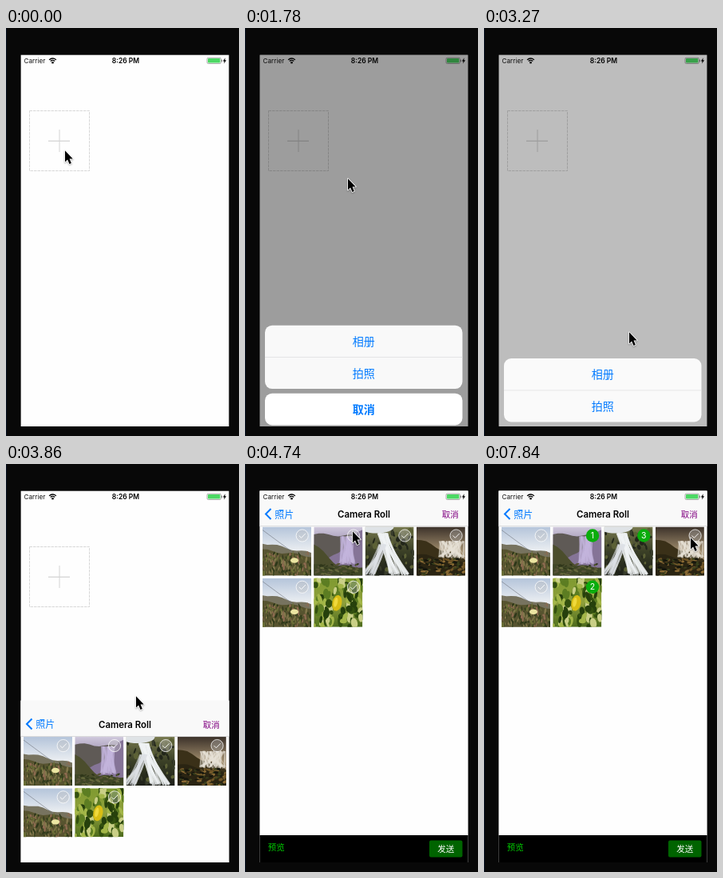
These frames come from a looping animation (292x510 px, 8000 ms). An HTML page with a canvas:

```html
<!DOCTYPE html>
<html lang="zh">
<head>
<meta charset="utf-8">
<title>Photo picker</title>
<style>
html, body { margin: 0; width: 100%; height: 100%; overflow: hidden; background: #080808; }
canvas { display: block; width: 292px; height: 510px; }
</style>
</head>
<body>
<canvas id="stage"></canvas>
<script>
const W = 292, H = 510, LOOP = 8000, STEPS = 54, SIZE = 61;
const canvas = document.getElementById('stage');
const c = canvas.getContext('2d');
const dpr = window.devicePixelRatio || 1;
canvas.width = W * dpr;
canvas.height = H * dpr;

const LATIN = 'Inter, Roboto, sans-serif';
const CJK = '"Noto Sans CJK SC", "Noto Sans CJK", sans-serif';
const BLUE = '#007aff';
const SCREEN = [18.4, 33.4, 261.2, 464.6];

// Pointer stops: step, x, y
const PATH = [
  [0, 74, 153], [2, 70, 153], [10, 70, 153], [12, 129, 188], [17, 179, 384],
  [20, 180, 387], [22, 182, 380], [26, 163, 290], [29, 150, 258], [32, 135, 84],
  [34, 135, 85], [37, 75, 150], [40, 149, 151], [43, 244, 417], [45, 192, 133],
  [48, 197, 87], [53, 259, 92]
];

function rect(color, x, y, w, h) {
  c.fillStyle = color;
  c.fillRect(x, y, w, h);
}

function round(color, x, y, w, h, r) {
  c.fillStyle = color;
  c.beginPath();
  c.roundRect(x, y, w, h, r);
  c.fill();
}

function trace(pts) {
  c.beginPath();
  for (let i = 0; i < pts.length; i += 2) c.lineTo(pts[i], pts[i + 1]);
}

function poly(color, ...pts) {
  trace(pts);
  c.fillStyle = color;
  c.fill();
}

function line(color, width, ...pts) {
  trace(pts);
  c.strokeStyle = color;
  c.lineWidth = width;
  c.stroke();
}

function oval(color, x, y, rx, ry = rx, turn = 0) {
  c.beginPath();
  c.ellipse(x, y, rx, ry, turn, 0, 7);
  c.fillStyle = color;
  c.fill();
}

function text(str, x, y, size, color, { align = 'center', weight = 400, font = CJK } = {}) {
  c.font = `${weight} ${size}px ${font}`;
  c.textAlign = align;
  c.textBaseline = 'middle';
  c.fillStyle = color;
  c.fillText(str, x, y);
}

// Remaining share of a critically damped spring begun at a given step
function spring(step, start) {
  const x = Math.max(0, step - start) * 2.71;
  return (1 + x) * Math.exp(-x);
}

function random(seed) {
  return () => {
    seed = (seed * 16807) % 2147483647;
    return seed / 2147483647;
  };
}

function backdrop(...colors) {
  const g = c.createLinearGradient(0, 0, 0, SIZE);
  colors.forEach((col, i) => g.addColorStop(i / (colors.length - 1), col));
  rect(g, 0, 0, SIZE, SIZE);
}

// Ground below a wavy line from the left edge to the right edge
function ridge(color, left, right, wave = 1.5) {
  const pts = [0, SIZE];
  for (let u = 0; u <= 1.01; u += 0.1) {
    pts.push(u * SIZE, left + (right - left) * u + wave * Math.sin(u * 11 + left));
  }
  poly(color, ...pts, SIZE, SIZE);
}

function specks(n, colors, top, rx, ry) {
  const rnd = random(n * 977);
  for (let i = 0; i < n; i++) {
    oval(colors[i % colors.length], rnd() * SIZE, top + rnd() * (SIZE - top), rx * (0.5 + rnd()), ry * (0.5 + rnd()), rnd() - 0.5);
  }
}

// Falling water: strands that fan out from one spot to another
function water(color, n, [x0, y0, w0], [x1, y1, w1]) {
  const rnd = random(n * 431);
  c.strokeStyle = color;
  for (let i = 0; i < n; i++) {
    const a = x0 + (rnd() - 0.5) * w0, b = x1 + (rnd() - 0.5) * w1;
    c.lineWidth = 0.8 + rnd() * 2;
    c.beginPath();
    c.moveTo(a, y0);
    c.quadraticCurveTo(a + (b - a) * 0.4, (y0 + y1) / 2, b, y1 - rnd() * 4);
    c.stroke();
  }
}

function meadow() {
  backdrop('#b4c4da', '#eceff2', '#d9d9d4');
  ridge('#77735f', 20, 33);
  ridge('#57532f', 29, 37);
  specks(150, ['#83784c', '#39441f', '#8d6a50', '#2c3618', '#6c7038'], 33, 0.9, 2.6);
  line('#70757c', 0.6, 0, 4, 38, 32);
  oval('#ece6a2', 40, 42, 5, 3.2);
}

function violetFalls() {
  backdrop('#cfc8dc', '#8b7da0', '#6a5c78');
  ridge('#5f5a56', 9, 12);
  ridge('#857497', 58, 4, 3);
  water('rgba(196,180,220,.55)', 40, [42, 12, 18], [41, 47, 20]);
  ridge('#4b4d2c', 22, 74, 2);
  ridge('#3f4626', 48, 50);
  specks(50, ['#66693c', '#2f3619', '#575238'], 46, 2.2, 1);
}

function cascade() {
  backdrop('#77794f', '#3b4026', '#1c1e18');
  specks(70, ['#5c6136', '#22261a', '#383c2b'], 4, 2, 3);
  oval('#dfe3e6', 14, 0, 22, 8);
  water('rgba(240,243,246,.6)', 36, [22, 8, 12], [42, 61, 26]);
  water('rgba(222,226,230,.6)', 22, [22, 22, 10], [4, 61, 16]);
}

function duskFalls() {
  backdrop('#3c322a', '#a08c6c', '#5a4526');
  ridge('#3a3018', 15, 40, 2);
  water('rgba(232,226,216,.55)', 44, [44, 18, 32], [44, 40, 34]);
  ridge('#2a2412', 34, 44);
  specks(90, ['#6e5426', '#39401c', '#15160d', '#8a6a34'], 40, 2.4, 1.2);
}

function pepper() {
  backdrop('#7f9a30', '#8fa03c', '#4c6a1c');
  specks(110, ['#a3b648', '#33500f', '#c9cf86', '#5c7d22', '#26400c'], 0, 3, 5);
  oval('#d8bd14', 29, 31, 6, 10, 0.2);
  oval('#f0d93c', 27.5, 30, 2.3, 6, 0.2);
}

const PHOTOS = [meadow, violetFalls, cascade, duskFalls, meadow, pepper];
// Photo index to step of its tap, in order of picking
const PICKS = new Map([[1, 34], [5, 39], [2, 48]]);

function badge(i, step) {
  const x = 49.7, y = 11;
  if (step >= PICKS.get(i)) {
    oval('#0aad0c', x, y, 8.2);
    text([...PICKS.keys()].indexOf(i) + 1, x, y + 0.5, 10.5, '#fff', { font: LATIN });
    return;
  }
  oval('rgba(190,190,190,.35)', x, y, 7.6);
  c.beginPath();
  c.arc(x, y, 7.6, 0, 7);
  c.strokeStyle = 'rgba(255,255,255,.85)';
  c.lineWidth = 0.9;
  c.stroke();
  line('rgba(255,255,255,.9)', 1, x - 4, y, x - 1.2, y + 2.8, x + 4.2, y - 2.7);
}

function photo(i, step) {
  c.save();
  c.translate(22 + (i % 4) * 64.3, 78.5 + Math.floor(i / 4) * 64.3);
  c.beginPath();
  c.rect(0, 0, SIZE, SIZE);
  c.clip();
  PHOTOS[i]();
  badge(i, step);
  c.restore();
}

function picker(step) {
  const left = spring(step, 25.454);
  if (left >= 1) return;
  c.save();
  c.translate(0, left * 465);
  rect('#fefefe', ...SCREEN);
  rect('#f9f9f9', 18, 33, 262, 45);
  rect('#c4c4c6', 18, 77.5, 262, 0.6);
  line(BLUE, 2, 32.5, 56, 26, 62.5, 32.5, 69);
  text('照片', 37.3, 63, 12, BLUE, { align: 'left' });
  text('Camera Roll', 149, 63.7, 11.4, '#000', { weight: 600, font: LATIN });
  text('取消', 257.3, 63, 10.5, '#800080');
  PHOTOS.forEach((_, i) => photo(i, step));
  rect('#000', 18, 464, 262, 34);
  text('预览', 39.3, 479.3, 10.5, '#00cc00', { weight: 500 });
  round('#006400', 231, 470.5, 41.5, 21, 2);
  text('发送', 251.7, 481.4, 10.5, '#fff');
  c.restore();
}

function statusBar() {
  text('Carrier', 22.5, 41.2, 8.2, '#111', { align: 'left', font: LATIN });
  text('8:26 PM', 150, 41.2, 8.5, '#000', { weight: 600, font: LATIN });
  c.strokeStyle = '#000';
  c.lineWidth = 1.3;
  for (const r of [6, 3.7]) {
    c.beginPath();
    c.arc(58.5, 44, r, -Math.PI * 0.76, -Math.PI * 0.24);
    c.stroke();
  }
  oval('#000', 58.5, 43.3, 1.3);
  c.strokeStyle = '#777';
  c.lineWidth = 0.6;
  c.beginPath();
  c.roundRect(252, 37.2, 17.4, 7.3, 1.5);
  c.stroke();
  round('#4cd964', 253, 38.1, 15.4, 5.5, 0.8);
  rect('#777', 270, 39.6, 0.9, 2.6);
  poly('#000', 274.7, 37.2, 271.9, 41.5, 273.6, 41.5, 273.1, 44.4, 276.1, 40.2, 274.3, 40.2);
}

function addBox() {
  c.save();
  c.setLineDash([3.5, 1]);
  c.strokeStyle = '#cecece';
  c.lineWidth = 0.8;
  c.strokeRect(29.5, 103.5, 75, 75);
  c.restore();
  line('#c8c8c8', 1, 53, 141.2, 80, 141.2);
  line('#d4d4d4', 1, 67, 127, 67, 155);
}

function sheet(step) {
  const open = step < 21.5 ? 1 - spring(step, 10.13) : spring(step, 21.54);
  if (open < 0.001) return;
  rect(`rgba(0,0,0,${0.4 * open})`, ...SCREEN);
  c.save();
  c.translate(0, (1 - open) * 131);
  round('rgba(251,251,251,.98)', 25, 366.7, 247.5, 79.4, 9);
  rect('#dcdcde', 25, 406.2, 247.5, 0.7);
  text('相册', 148.8, 386.5, 14, BLUE);
  text('拍照', 148.8, 426.5, 14, BLUE);
  round('#fff', 25, 451.7, 247.5, 39.7, 9);
  text('取消', 148.8, 471.5, 14, BLUE, { weight: 700 });
  c.restore();
}

function pointer(step) {
  const n = Math.max(1, PATH.findIndex(p => p[0] >= step));
  const [s0, x0, y0] = PATH[n - 1], [s1, x1, y1] = PATH[n];
  const u = (step - s0) / (s1 - s0);
  c.save();
  c.translate(x0 + (x1 - x0) * u - 0.7, y0 + (y1 - y0) * u - 0.4);
  c.scale(0.95, 0.95);
  trace([0.7, 0.8, 0.7, 15.6, 4, 12.6, 6.5, 18.3, 9, 17.2, 6.6, 11.6, 11, 11.4]);
  c.closePath();
  c.lineJoin = 'round';
  c.shadowColor = 'rgba(0,0,0,.3)';
  c.shadowBlur = 2 * dpr;
  c.shadowOffsetY = dpr;
  c.strokeStyle = '#fff';
  c.lineWidth = 1.8;
  c.stroke();
  c.shadowColor = 'transparent';
  c.fillStyle = '#000';
  c.fill();
  c.restore();
}

function draw(time) {
  // The screen refreshes in even steps
  const step = Math.min(STEPS - 1, Math.floor((time + 20) * STEPS / LOOP));
  c.setTransform(dpr, 0, 0, dpr, 0, 0);
  rect('#080808', 0, 0, W, H);
  rect('#07111f', 0, 0, 1, H);
  c.save();
  c.beginPath();
  c.rect(...SCREEN);
  c.clip();
  rect('#fefefe', ...SCREEN);
  addBox();
  picker(step);
  statusBar();
  sheet(step);
  c.restore();
  pointer(step);
}

let begin;
function tick(now) {
  begin ??= now;
  draw((now - begin) % LOOP);
  requestAnimationFrame(tick);
}
draw(0);
requestAnimationFrame(tick);
</script>
</body>
</html>
```
